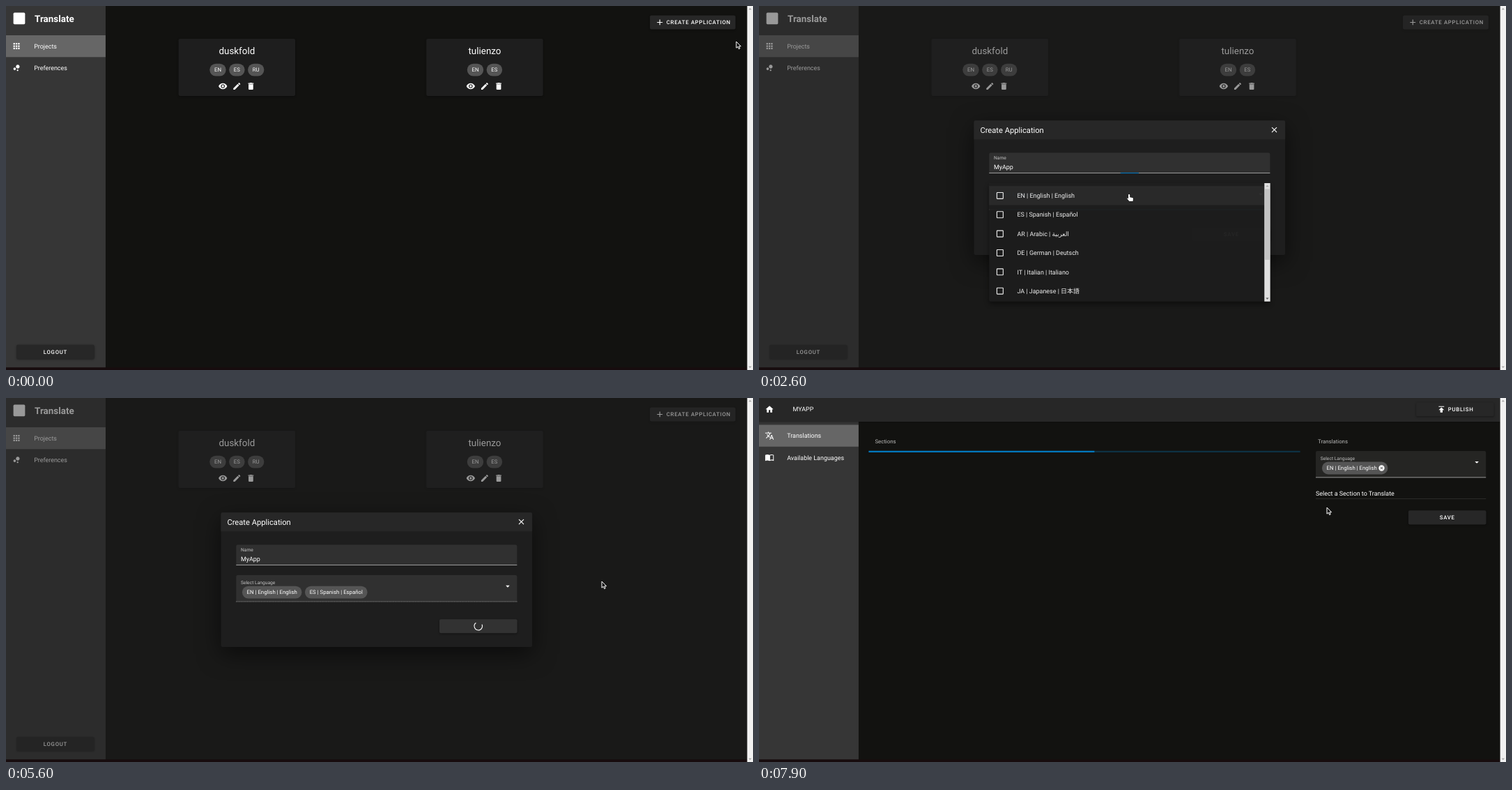
These frames come from a looping animation (1072 px wide and 522 px high, 8000 ms). An HTML page with a canvas:

```html
<!DOCTYPE html>
<html lang="en">
<head>
<meta charset="utf-8">
<title>Translate</title>
<style>
html, body { margin: 0; width: 100%; height: 100%; overflow: hidden; background: #121210; }
canvas { display: block; width: 1072px; height: 522px; }
</style>
</head>
<body>
<canvas id="stage" width="1072" height="522"></canvas>
<script>
const ctx = document.getElementById('stage').getContext('2d');
const LOOP = 8000, STEP = 100;
const S = 1072 / 1920;              // layout is in 1920-wide units
const W = 1905, H = 935;
const FONT = 'Roboto, "Noto Sans CJK JP", "DejaVu Sans", sans-serif';
const BLUE = '#0277bd', CARD = '#1e1e1e', BTN = '#272727', CHIP = '#555';
const white = a => `rgba(255,255,255,${a})`;

const icons = {
  plus: 'M19 13h-6v6h-2v-6H5v-2h6V5h2v6h6z',
  close: 'M19 6.41L17.59 5 12 10.59 6.41 5 5 6.41 10.59 12 5 17.59 6.41 19 12 13.41 17.59 19 19 17.59 13.41 12z',
  down: 'M7 10l5 5 5-5z',
  eye: 'M12 9a3 3 0 1 1 0 6 3 3 0 1 1 0-6m0-4.5c5 0 9.27 3.11 11 7.5-1.73 4.39-6 7.5-11 7.5S2.73 16.39 1 12c1.73-4.39 6-7.5 11-7.5M12 7a5 5 0 1 0 0 10 5 5 0 1 0 0-10z',
  pencil: 'M20.71 7.04c.39-.39.39-1.04 0-1.41l-2.34-2.34c-.37-.39-1.02-.39-1.41 0l-1.84 1.83 3.75 3.75M3 17.25V21h3.75L17.81 9.93l-3.75-3.75z',
  trash: 'M19 4h-3.5l-1-1h-5l-1 1H5v2h14M6 19a2 2 0 0 0 2 2h8a2 2 0 0 0 2-2V7H6z',
  apps: [4, 10, 16].flatMap(y => [4, 10, 16].map(x => `M${x} ${y}h4v4h-4z`)).join(''),
  bubbles: 'M7.2 11.2a3.2 3.2 0 1 0 .01 0zM14.8 16a2 2 0 1 0 .01 0zM15.2 4a4.8 4.8 0 1 0 .01 0z',
  box: 'M19 3H5a2 2 0 0 0-2 2v14a2 2 0 0 0 2 2h14a2 2 0 0 0 2-2V5a2 2 0 0 0-2-2m0 2v14H5V5z',
  checked: 'M10 17l-5-5 1.41-1.41L10 14.17l7.59-7.59L19 8zM19 3H5a2 2 0 0 0-2 2v14a2 2 0 0 0 2 2h14a2 2 0 0 0 2-2V5a2 2 0 0 0-2-2z',
  home: 'M10 20v-6h4v6h5v-8h3L12 3 2 12h3v8z',
  publish: 'M5 4v2h14V4zm0 10h4v6h6v-6h4l-7-7z',
  cancel: 'M12 2a10 10 0 1 0 0 20 10 10 0 1 0 0-20m5 13.59L15.59 17 12 13.41 8.41 17 7 15.59 10.59 12 7 8.41 8.41 7 12 10.59 15.59 7 17 8.41 13.41 12z',
  language: 'M12.87 15.07l-2.54-2.51.03-.03A17.52 17.52 0 0 0 14.07 6H17V4h-7V2H8v2H1v2h11.17C11.5 7.92 10.44 9.75 9 11.35 8.07 10.32 7.3 9.19 6.69 8h-2c.73 1.63 1.73 3.17 2.98 4.56l-5.09 5.02L4 19l5-5 3.11 3.11zM18.5 10h-2L12 22h2l1.12-3h4.75L21 22h2zm-2.62 7l1.62-4.33L19.12 17z',
  book: 'M1 5.5Q6.5 3 12 5.5 17.5 3 23 5.5V20.5Q17.5 18 12 20.5 6.5 18 1 20.5zM13.5 6.7V18Q17.5 16.3 21.3 17.6V6.3Q17 5 13.5 6.7z'
};
for (const k in icons) icons[k] = new Path2D(icons[k]);

const pointers = {
  arrow: new Path2D('M0 0V9.2L2.2 7.3 3.7 10.6 5.2 9.9 3.8 6.8H6.6z'),
  hand: new Path2D('M0 0c.8 0 1.2.5 1.2 1.2v3l3.6.8c.8.2 1.2.8 1.1 1.6l-.4 3.4h-5l-3.4-4c.4-.8 1.2-.7 2 .2V1.2C-.9.5-.6 0 0 0z'),
  beam: new Path2D('M-2-5H2M0-5V5M-2 5H2')
};

// time, x, y, shape
const track = [
  [0, 1048, 51, 'arrow'], [250, 1048, 51, 'arrow'], [400, 1019, 32, 'arrow'], [500, 1019, 32, 'arrow'],
  [600, 1008, 27, 'hand'], [800, 1006, 30, 'hand'], [900, 1005, 37, 'arrow'], [1400, 560, 232, 'beam'],
  [2100, 560, 232, 'beam'], [2300, 531, 270, 'hand'], [3000, 531, 270, 'hand'], [3300, 545, 297, 'hand'],
  [3400, 545, 297, 'hand'], [3800, 677, 277, 'hand'], [4000, 748, 300, 'arrow'], [4200, 748, 300, 'arrow'],
  [4500, 688, 329, 'hand'], [4700, 691, 331, 'arrow'], [5600, 855, 263, 'arrow'], [6200, 896, 196, 'arrow'],
  [6500, 882, 112, 'hand'], [6800, 882, 112, 'arrow'], [7400, 880, 115, 'arrow'], [7900, 815, 157, 'arrow']
];

const clamp = v => Math.max(0, Math.min(1, v));

function bezier(x1, y1, x2, y2) {
  const at = (u, a, b) => 3 * (1 - u) * (1 - u) * u * a + 3 * (1 - u) * u * u * b + u ** 3;
  return x => {
    if (x <= 0 || x >= 1) return clamp(x);
    let lo = 0, hi = 1;
    for (let i = 0; i < 24; i++) {
      const mid = (lo + hi) / 2;
      if (at(mid, x1, x2) < x) lo = mid; else hi = mid;
    }
    return at(lo, y1, y2);
  };
}
const swift = bezier(.25, .8, .25, 1);
const ease = bezier(.25, .1, .25, 1);
const inOut = bezier(.42, 0, .58, 1);

function rect(x, y, w, h, color, r = 0) {
  ctx.fillStyle = color;
  ctx.beginPath();
  ctx.roundRect(x, y, w, h, r);
  ctx.fill();
}

function text(str, x, cy, size, { color = '#fff', weight = 400, align = 'left', gap = 0 } = {}) {
  ctx.font = `${weight} ${size}px ${FONT}`;
  ctx.letterSpacing = gap + 'px';
  ctx.textAlign = align;
  ctx.fillStyle = color;
  ctx.fillText(str, x, cy + size * .355);
}

function icon(name, cx, cy, color = '#fff', size = 24) {
  ctx.save();
  ctx.translate(cx - size / 2, cy - size / 2);
  ctx.scale(size / 24, size / 24);
  ctx.fillStyle = color;
  ctx.fill(icons[name], 'evenodd');
  ctx.restore();
}

function shadow(blur, dy, alpha, draw) {
  ctx.save();
  ctx.shadowColor = `rgba(0,0,0,${alpha})`;
  ctx.shadowBlur = blur * S;
  ctx.shadowOffsetY = dy * S;
  draw();
  ctx.restore();
}

const caps = (str, x, cy, align = 'left', color = '#fff') =>
  text(str, x, cy, 14, { color, weight: 500, align, gap: 1.25 });

function button(label, x, y, w = 200) {
  shadow(5, 2, .4, () => rect(x, y, w, 36, BTN, 4));
  if (label) caps(label, x + w / 2, y + 18, 'center');
}

function chipWidth(label) {
  ctx.font = `400 14px ${FONT}`;
  ctx.letterSpacing = '0px';
  return ctx.measureText(label).width + 24;
}

function chip(label, x, cy, extra = 0) {
  const w = chipWidth(label) + extra;
  rect(x, cy - 16, w, 32, CHIP, 16);
  text(label, x + 12, cy, 14);
  if (extra) icon('cancel', x + w - 16, cy, '#fff', 18);
  return w;
}

function field(x, y, w, h, dotted) {
  rect(x, y, w, h, white(.08), [4, 4, 0, 0]);
  ctx.strokeStyle = white(.7);
  ctx.lineWidth = 1.4;
  ctx.setLineDash(dotted ? [2, 2] : []);
  ctx.beginPath();
  ctx.moveTo(x, y + h);
  ctx.lineTo(x + w, y + h);
  ctx.stroke();
  ctx.setLineDash([]);
}

// label sliding between its resting and floating place
function fieldLabel(str, x, rest, up, p, color) {
  text(str, x, rest + (up - rest) * p, 16 - 4 * p, { color });
}

function focusLine(y, p) {
  if (p > 0) rect(952.5 - 361 * p, y - 1, 722 * p, 2, BLUE);
}

function scrollbar(x, y, h, thumb) {
  rect(x, y, 15, h, '#f1f1f1');
  if (thumb) rect(x + 1.5, y + 15, 12, thumb, '#c1c1c1');
  const tip = (cy, d, color) => {
    ctx.fillStyle = color;
    ctx.beginPath();
    ctx.moveTo(x + 3.5, cy + 2 * d);
    ctx.lineTo(x + 11.5, cy + 2 * d);
    ctx.lineTo(x + 7.5, cy - 2 * d);
    ctx.fill();
  };
  tip(y + 7.5, 1, '#a3a3a3');
  tip(y + h - 7.5, -1, thumb ? '#505050' : '#a3a3a3');
}

function sidebar(top, rows) {
  rect(0, 0, 256, H, '#363636');
  rect(0, top, 256, 56, white(.24));
  rows.forEach(([name, label], i) => {
    const cy = top + 28 + 56 * i;
    icon(name, 27, cy);
    text(label, 72, cy, 16);
  });
}

function card(cx, title, langs) {
  shadow(5, 2, .35, () => rect(cx - 150, 84, 300, 147, CARD, 4));
  text(title, cx, 115.5, 24, { align: 'center' });
  let x = cx - (langs.reduce((sum, l) => sum + chipWidth(l) + 8, -8)) / 2;
  for (const l of langs) x += chip(l, x, 164) + 8;
  ['eye', 'pencil', 'trash'].forEach((n, i) => icon(n, cx + 36 * (i - 1), 206));
}

function projects(t) {
  sidebar(75, [['apps', 'Projects'], ['bubbles', 'Preferences']]);
  rect(19, 17, 30, 30, '#fff', 3);
  text('Translate', 73.5, 32, 24, { weight: 700 });
  button('LOGOUT', 27, 870);

  button('', 1655, 24, 220);
  if (t >= 600 && t < 1500) rect(1655, 24, 220, 36, white(t < 800 ? .1 : .25), 4);
  icon('plus', 1680.5, 42);
  caps('CREATE APPLICATION', 1697.5, 42);

  const added = t >= 5800;
  const mid = added ? 1080 : 911.9, pitch = added ? 537.4 : 637;
  const first = added ? mid - pitch : mid - pitch / 2;
  card(first, 'duskfold', ['EN', 'ES', 'RU']);
  card(first + pitch, 'tulienzo', ['EN', 'ES']);
  if (added) card(first + 2 * pitch, 'MyApp', ['EN', 'ES']);
}

function spinner(cx, cy, ms) {
  const k = (ms % 1400) / 1400, a = inOut(clamp(k * 2)), b = inOut(clamp(k * 2 - 1));
  const from = 15 * a + 110 * b, to = Math.min(from + 1 + 99 * a, 125.6);
  const turn = k * Math.PI * 2;
  ctx.strokeStyle = '#fff';
  ctx.lineWidth = 2;
  ctx.beginPath();
  ctx.arc(cx, cy, 10.3, turn + from / 20, turn + to / 20);
  ctx.stroke();
}

function saveButton(t) {
  const x = 1114, y = 568;
  if (t < 1700) {
    rect(x, y, 200, 36, white(.12), 4);
    caps('SAVE', 1214, 586, 'center', white(.3));
    return;
  }
  const busy = t >= 4600;
  button(busy ? '' : 'SAVE', x, y);
  if (!busy) {
    if (t >= 4400) rect(x, y, 200, 36, white(.08), 4);
    return;
  }
  rect(x, y, 200, 36, white(.05), 4);
  const fade = 1 - clamp((t - 4850) / 300);
  if (fade > 0) {
    ctx.save();
    ctx.beginPath();
    ctx.roundRect(x, y, 200, 36, 4);
    ctx.clip();
    ctx.fillStyle = white(.25 * fade);
    ctx.beginPath();
    ctx.arc(1232, 591, 130 * clamp((t - 4580) / 310), 0, 7);
    ctx.fill();
    ctx.restore();
  }
  if (t >= 4700) spinner(1214, 586, t - 4690);
}

function dialog(t) {
  const p = t < 5000 ? swift((t - 765) / 300) : 1 - swift((t - 5650) / 300);
  if (p <= 0) return;
  rect(0, 0, W, H, `rgba(33,33,33,${.46 * p})`);

  const k = .5 + .5 * p, x = 591.5, w = 722;
  ctx.save();
  ctx.globalAlpha = p;
  ctx.translate(952.5, 467.5);
  ctx.scale(k, k);
  ctx.translate(-952.5, -467.5);
  shadow(60, 18, .55, () => rect(552.5, 294, 800, 345.5, CARD, 4));
  rect(552.5, 294, 800, 48.5, BTN, [4, 4, 0, 0]);
  text('Create Application', 568.5, 318, 20);
  icon('close', 1324.5, 318);

  const blur = swift((t - 2450) / 300);
  const focus = swift((t - 1550) / 300) * (1 - blur);
  field(x, 377, w, 52);
  focusLine(429, focus);
  fieldLabel('Name', x + 12, 404, 390.5, swift((t - 1550) / 200), focus > .5 ? BLUE : white(.7));
  const typed = 'MyApp'.slice(0, Math.max(0, Math.floor((t - 1600) / 100)));
  text(typed, x + 12, 414, 16);
  if (t >= 1600 && t < 2450) rect(x + 13 + ctx.measureText(typed).width, 404, 1.2, 19, '#fff');

  const pick = t >= 2450 && t < 4600;
  field(x, 455, w, 68, t >= 4600);
  focusLine(523, pick ? swift((t - 2450) / 300) : 0);
  fieldLabel('Select Language', x + 12, 482.5, 474, swift((t - 2900) / 200), pick ? BLUE : white(.7));
  let cx = x + 15.5;
  if (t >= 3000) cx += chip('EN | English | English', cx, 499) + 8;
  if (t >= 3300) chip('ES | Spanish | Español', cx, 499);
  icon('down', 1289.5, 483.5);
  saveButton(t);
  ctx.restore();
  menu(t);
}

function menu(t) {
  const show = swift((t - 2460) / 300) * (1 - clamp((t - 4050) / 200));
  if (show <= 0) return;
  const x = 591.5, y = 455;
  const rows = ['EN | English | English', 'ES | Spanish | Español', 'AR | Arabic | العربية',
    'DE | German | Deutsch', 'IT | Italian | Italiano', 'JA | Japanese | 日本語'];
  const hover = t < 3200 || (t >= 3700 && t < 3900) ? 0 : t < 3700 ? 1 : -1;
  ctx.save();
  ctx.globalAlpha = show;
  shadow(14, 6, .5, () => rect(x, y, 722, 304, CARD, 4));
  rows.forEach((label, i) => {
    const cy = 487 + 49 * i;
    const on = (i === 0 && t >= 3000) || (i === 1 && t >= 3300);
    if (on) {
      ctx.globalAlpha = show * .24;
      rect(x, cy - 24.5, 707.5, 49, BLUE);
      ctx.globalAlpha = show;
    } else if (i === hover) rect(x, cy - 24.5, 707.5, 49, white(.06));
    const color = on ? BLUE : '#fff';
    icon(on ? 'checked' : 'box', 619.5, cy, color);
    text(label, 663.5, cy, 16, { color });
  });
  scrollbar(1299, y, 304, 182);
  ctx.restore();
}

function editor(t) {
  sidebar(69, [['language', 'Translations'], ['book', 'Available Languages']]);
  shadow(5, 2, .4, () => rect(0, 0, W, 61, BTN));
  icon('home', 27, 29);
  text('MYAPP', 87, 29, 16);
  button('', 1689, 11);
  icon('publish', 1754, 29);
  caps('PUBLISH', 1771, 29);
  if (t < 7500) return;

  const soft = { color: white(.7) };
  text('Sections', 298, 112, 14, soft);
  const p = ease((t - 7523) / 1320), x = 282, w = 1109;
  rect(x, 135.5, w, 4, 'rgba(2,119,189,.3)');
  const from = Math.max(0, 3.07 * p - 2), to = Math.min(1, 1.08 * p);
  rect(x + from * w, 135.5, Math.max(0, to - from) * w, 4, BLUE);

  text('Translations', 1436.5, 112, 14, soft);
  field(1431, 136, 437.5, 68);
  text('Select Language', 1443, 155, 12, soft);
  chip('EN | English | English', 1447, 180, 16);
  icon('down', 1845, 165);
  text('Select a Section to Translate', 1431, 245, 16);
  rect(1431, 258, 437.5, 1.2, white(.14));
  button('SAVE', 1669, 289);
}

function pointer(t) {
  let i = track.length - 1;
  while (track[i][0] > t) i--;
  const a = track[i], b = track[i + 1] || a;
  const k = a === b ? 0 : inOut((t - a[0]) / (b[0] - a[0]));
  ctx.save();
  ctx.translate(a[1] + (b[1] - a[1]) * k, a[2] + (b[2] - a[2]) * k);
  const path = pointers[a[3]], hand = a[3] === 'hand';
  ctx.lineWidth = 1;
  ctx.strokeStyle = hand ? '#111' : '#fff';
  ctx.fillStyle = hand ? '#fff' : '#111';
  if (a[3] !== 'beam') ctx.fill(path);
  ctx.stroke(path);
  if (hand) ctx.fill(path);
  ctx.restore();
}

function draw(t) {
  ctx.setTransform(S, 0, 0, S, 0, 0);
  ctx.textRendering = 'geometricPrecision';
  rect(0, 0, 1920, H, '#121210');
  if (t < 6800) {
    projects(t);
    dialog(t);
  } else editor(t);
  rect(0, 928, W, 7, '#170c0e');
  scrollbar(W, 0, H);
  ctx.setTransform(1, 0, 0, 1, 0, 0);
  pointer(t);
}

function tick() {
  draw(Math.floor((performance.now() % LOOP) / STEP) * STEP);
  requestAnimationFrame(tick);
}
tick();
</script>
</body>
</html>
```
